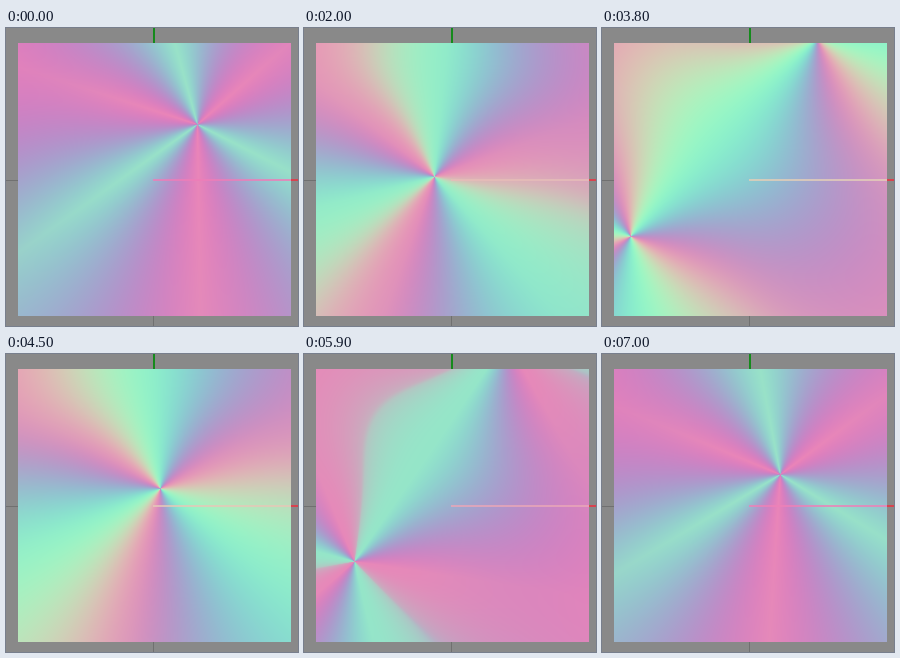
Write an HTML page with a canvas that moves like this. It is 292x298 px and loops after 7100 ms.

```html
<!DOCTYPE html>
<html lang="en">
<head>
<meta charset="utf-8">
<title>Iridescent plane</title>
<style>
html, body { margin: 0; width: 292px; height: 298px; overflow: hidden; background: #898989; }
canvas { display: block; }
</style>
</head>
<body>
<canvas id="stage" width="292" height="298"></canvas>
<script>
const LOOP = 7100, STEP = 100, CYCLES = 3;
const LEFT = 12, TOP = 15, SIZE = 273;
const ctx = document.getElementById('stage').getContext('2d');
const image = ctx.createImageData(SIZE, SIZE);

// Path of the main apex over one cycle: [phase, x, y]
const path = [
  [0, 191, 96], [.17, 147, 154], [.465, 86, 195], [.493, 50, 207],
  [.605, 28, 208], [.958, 178, 120], [1, 191, 96]
];

const mix = (a, b, k) => a + (b - a) * k;

function apexAt(phase) {
  const n = path.findIndex(point => point[0] > phase);
  const [p0, x0, y0] = path[n - 1], [p1, x1, y1] = path[n];
  const k = (phase - p0) / (p1 - p0);
  return [mix(x0, x1, k), mix(y0, y1, k)];
}

// Three uneven lobes around an apex, as an angle that peaks at each lobe
const lobes = angle => 3 * (angle - .13 * (1 - Math.cos(angle)));

function drawPlane(time) {
  const [ax, ay] = apexAt(time / LOOP * CYCLES % 1);
  // The far apex swings against the main one; their first lobes face each other
  const bx = 215 - .6 * (ax - 28), by = 10 - 1.1 * (ax - 28);
  const facing = Math.atan2(by - ay, bx - ax);
  const peach = Math.sin(Math.PI * time / LOOP);
  const pinkness = .3 * Math.cos(2 * Math.PI * time / LOOP);
  const side = wave => mix(Math.abs(wave), wave, peach);
  const pixels = image.data;

  for (let p = 0; p < pixels.length; p += 4) {
    const i = p / 4, x = LEFT + i % SIZE, y = TOP + Math.floor(i / SIZE);
    const dxA = x - ax, dyA = y - ay, dxB = x - bx, dyB = y - by;
    const a = lobes(Math.atan2(dyA, dxA) - facing);
    const b = lobes(facing + Math.PI - Math.atan2(dyB, dxB));
    const nearA = dxA * dxA + dyA * dyA, nearB = dxB * dxB + dyB * dyB;
    const k = nearA / (nearA + nearB + .01);

    // mint: -1 pink to 1 mint; violet: -1 peach to 1 violet
    let mint = mix(Math.cos(a), Math.cos(b), k) - pinkness;
    let violet = mix(side(Math.sin(a)), side(Math.sin(b)), k);
    const boost = 1 / Math.sqrt(Math.max(Math.hypot(mint, violet), .05));
    mint *= boost;
    violet *= boost;

    pixels[p] = 187 - 41 * mint - 23 * violet;
    pixels[p + 1] = 186 + 47 * mint - 24 * violet;
    pixels[p + 2] = 193 + 8 * mint + 12 * violet;
    pixels[p + 3] = 255;
  }
  ctx.putImageData(image, LEFT, TOP);
  bar(`rgba(${mix(238, 228, peach)}, ${mix(125, 208, peach)}, 184, .8)`, 147, 151, 138, 2);
}

function bar(color, x, y, w, h) {
  ctx.fillStyle = color;
  ctx.fillRect(x, y, w, h);
}

function draw(time) {
  bar('#898989', 0, 0, 292, 298);
  bar('#707070', 0, 152, 12, 1);
  bar('#707070', 147, 288, 1, 10);
  bar('#158a1c', 147, 0, 2, 15);
  drawPlane(time);
  bar('#d8434f', 285, 151, 7, 2);
}

let shown = -1;
function tick() {
  const time = Math.floor(performance.now() % LOOP / STEP) * STEP;
  if (time !== shown) draw(shown = time);
  requestAnimationFrame(tick);
}
tick();
</script>
</body>
</html>
```
